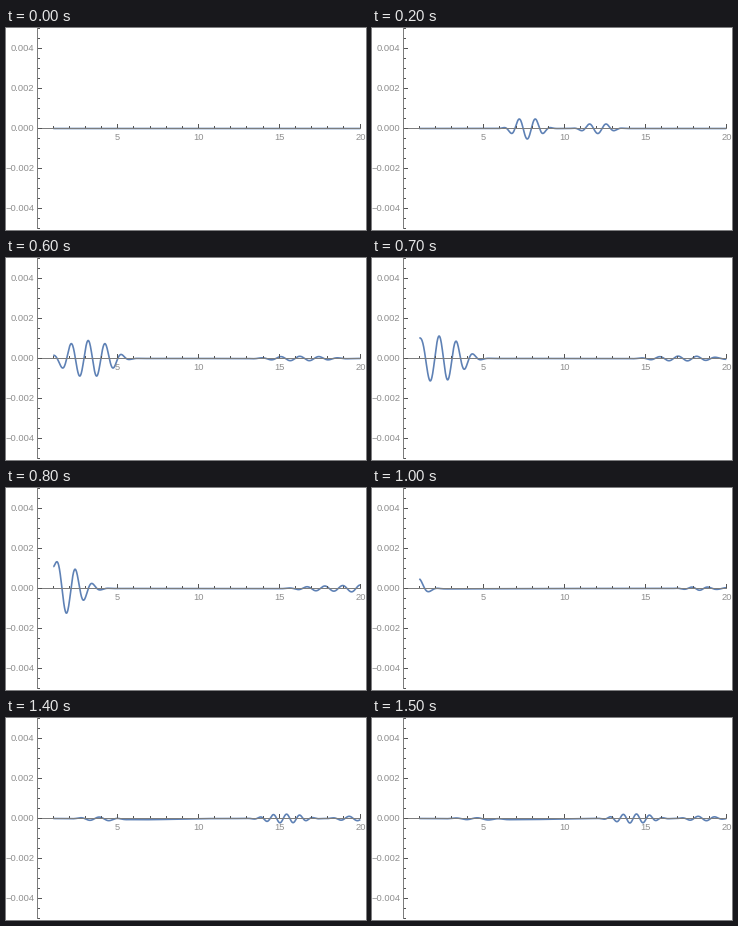
Recreate the animation shown at these times as a matplotlib script. Size 360 px wide and 202 px high, loop 1600 ms.

```python
import numpy as np
import matplotlib.pyplot as plt
from matplotlib.animation import FuncAnimation

W, H, DPI = 360, 202, 100
PX = 72 / DPI              # points per pixel
LEFT, RIGHT, ZERO = 47, 354, 100.5
FRAMES = 16
BLUE, AXIS, TICK, TEXT = "#5e81b5", "#7d7d7d", "#555555", "#8f8f8f"


def packet(s, amp, half, width, phase):
    """Wave train around s = 0; half is half a wavelength, phase is in units of pi."""
    return amp * np.exp(-np.abs(s / width) ** 3) * np.cos(np.pi * (s / half + phase))


def track(n, times, *rows):
    return [np.interp(n, times, row) for row in rows]


def inward(x, n):
    """Train running to the inner wall, slowed and steepened close to it."""
    d = x - LEFT
    q = d * d / (d + 4)
    shape = track(n, (0, 2, 4, 6, 8, 9),
                  (0, 10.5, 8, 18, 27, 58),
                  (8.2, 8.2, 6.9, 8.4, 8.5, 8.5),
                  (17.5, 17.5, 27, 29, 34, 34),
                  (1, 1, 0, 0, -0.8, -0.8))
    return packet(q - (140.5 - 18.2 * n), *shape)


def outward(x, n):
    """Train running to the outer wall, plus its mirror image coming back."""
    shape = track(n, (0, 2, 4, 6, 8, 12, 15),
                  (0, 5, 2.8, 2.2, 2.5, 4, 4.5),
                  (8.5, 8.5, 7.9, 9.6, 9, 6.6, 6.6),
                  (17.5, 17.5, 27, 36, 38, 24, 24),
                  (1, 1, 0, 0, 1, 0, 0.4))
    s = x - (191.5 + 17 * n)
    back = 2 * RIGHT - x - (191.5 + 17 * n)
    return packet(s, *shape) + packet(back, *shape)


def echo(x, n):
    """Faint remainder leaving the inner wall, with a shallow sag ahead of it."""
    amp, half, width, sag = track(n, (9, 12, 15),
                                  (0, 3.3, 1), (7, 7, 11), (11, 11, 26), (0, 1.3, 1.1))
    s = x - (69 + 12 * (n - 12))
    return packet(s, amp, half, width, 0) - sag * np.exp(-((s - 45) / 40) ** 2)


def straggler(x, n):
    return packet(x - (330 + 17 * (15 - n)), 2.2, 8.4, 19, 0.5)


def height(x, n):
    return sum(part(x, n) for part in (inward, outward, echo, straggler))


fig = plt.figure(figsize=(W / DPI, H / DPI), dpi=DPI, facecolor="white")
ax = fig.add_axes([0, 0, 1, 1])
ax.set_xlim(0, W)
ax.set_ylim(H, 0)
ax.axis("off")


def rule(xs, ys, color):
    ax.plot(xs, ys, color=color, lw=PX, solid_capstyle="butt", snap=False, zorder=3)


def label(x, y, text, ha):
    ax.text(x, y, text, ha=ha, va="center_baseline", color=TEXT,
            family="Liberation Sans", size=9.4 * PX)


rule([31.5, 31.5], [0, 201], AXIS)
rule([31, RIGHT + 1], [ZERO, ZERO], AXIS)

for i in range(21):
    y = 10 * i + 0.5
    major = i % 4 == 2
    rule([32, 36 if major else 34], [y, y], TICK)
    if major:
        value = (10 - i) * 0.0005
        label(28.4, y - 0.8, f"{value:.3f}".replace("-", "\u2212"), "right")

for v in range(1, 21):
    x = int(30.9 + 16.16 * v) + 0.5
    major = v % 5 == 0
    rule([x, x], [100, 96 if major else 98], TICK)
    if major:
        label(x, 108.2, str(v), "center")

X = np.linspace(LEFT, RIGHT, 1200)
curve, = ax.plot([], [], color=BLUE, lw=1.65 * PX, zorder=2, snap=False,
                 solid_capstyle="butt", solid_joinstyle="round")


def draw(n):
    curve.set_data(X + 0.3, ZERO - height(X, n))
    return curve,


anim = FuncAnimation(fig, draw, frames=FRAMES, interval=100, repeat=True,
                     repeat_delay=0, blit=False)
plt.show()
```
